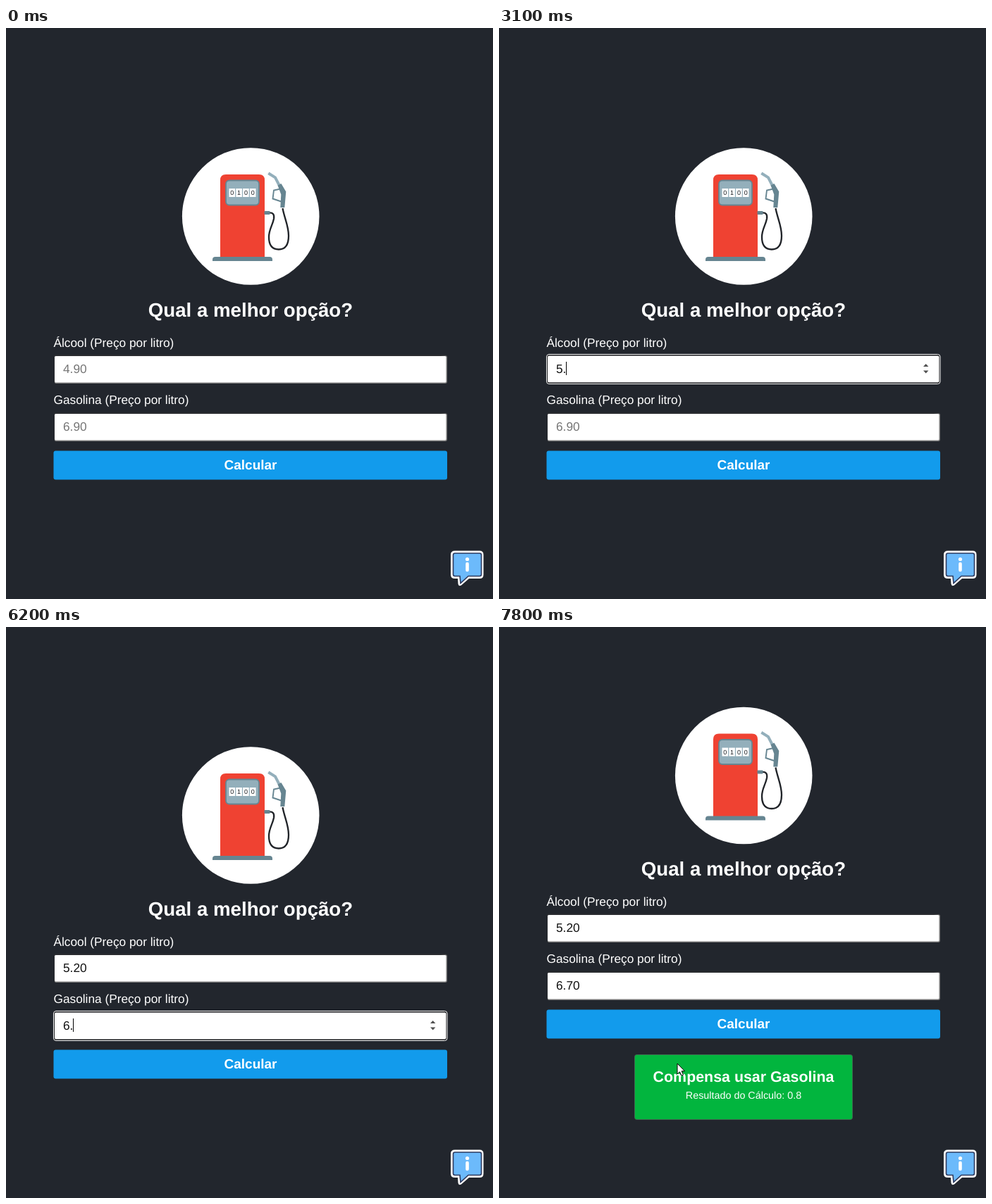
Animation of 691x811 px, one loop 8000 ms. Source, as an HTML page:

```html
<!DOCTYPE html>
<html lang="pt">
<head>
<meta charset="utf-8">
<title>Qual a melhor opção?</title>
<style>
  html, body { margin: 0; width: 100%; height: 100%; overflow: hidden; background: #22262d; }
  svg { display: block; }
  text { font: 17.28px "Liberation Sans", Arial, sans-serif; fill: #fff; text-rendering: geometricPrecision; white-space: pre; }
  .mid { text-anchor: middle; }
  .bold { font-weight: bold; }
  #title { font-size: 27.65px; }
  #button { font-size: 19px; }
  #verdict { font-size: 21.4px; }
  #ratio { font-size: 14.35px; }
  .digits text { font-size: 9px; fill: #16191d; }
  .value { fill: #111; }
  .value.hint { fill: #757575; }
</style>
</head>
<body>
<svg width="691" height="811" viewBox="0 0 691 811">
  <defs>
    <g id="box">
      <rect x="68" y="464" width="558" height="41" rx="3" fill="#2a2c30"/>
      <path d="M624 465.5q2 0 2 2V502q0 3-3 3H71q-2 0-2-2z" fill="#7b7b7b"/>
      <rect x="69" y="466" width="555.5" height="37.5" rx="1.5" fill="#fff"/>
    </g>
    <g id="ring">
      <rect x="67.5" y="463.5" width="558.5" height="42" rx="3.5" fill="#101114" stroke="#fff"/>
      <rect x="69" y="465.5" width="555.5" height="38" rx="2" fill="#fff"/>
    </g>
    <path id="spin" d="M602 481l3.7-4 3.7 4zM602 486.5l3.7 4 3.7-4z" fill="#505050"/>
  </defs>

  <g id="pump">
    <circle cx="347.2" cy="267.5" r="97.3" fill="#fff"/>
    <path d="M304 326V216q0-8 8-8h47q8 0 8 8v110z" fill="#ef4232"/>
    <path d="M293 331v-2q0-4 4-4h77q4 0 4 4v2z" fill="#668591"/>
    <rect x="312" y="216.5" width="47" height="35" rx="5" fill="#93afbb" stroke="#668591" stroke-width="1.8"/>
    <path d="M316.5 228h8.6v12h-8.6zM326.3 228h8.6v12h-8.6zM336.1 228h8.6v12h-8.6zM345.9 228h8.6v12h-8.6z" fill="#fff"/>
    <g class="digits mid bold">
      <text x="320.8" y="237.2">0</text><text x="330.6" y="237.2">1</text>
      <text x="340.4" y="237.2">0</text><text x="350.2" y="237.2">0</text>
    </g>
    <path d="M373 262.5C379 262 381 265 380 271C378 281 373 286 373 297C373 309 378 314.5 387 314.5C397 314.5 401 307 401 295C401 281 395 270 392.5 256" fill="none" stroke="#202328" stroke-width="2.3"/>
    <rect x="366.5" y="260" width="8" height="5" rx="1" fill="#668591"/>
    <path d="M372.3 206.3L382 212.3L387.5 223" fill="none" stroke="#93afbb" stroke-width="4"/>
    <path d="M389.5 228.5L380 230.5L378.5 242.5L390.5 246.5" fill="none" stroke="#668591" stroke-width="1.9"/>
    <path d="M385.5 223.5l5-2.5 6.8 11.5-2 22.5h-6l1-18.500z" fill="#668591"/>
  </g>

  <g id="form">
    <text id="title" class="mid bold" x="347" y="410">Qual a melhor opção?</text>
    <text x="67.5" y="453">Álcool (Preço por litro)</text>
    <text x="67.5" y="534.3">Gasolina (Preço por litro)</text>
    <g class="field">
      <use href="#box"/><use class="ring" href="#ring"/><use class="spin" href="#spin"/>
      <text class="value" x="81" y="490"></text>
    </g>
    <g class="field" transform="translate(0 82)">
      <use href="#box"/><use class="ring" href="#ring"/><use class="spin" href="#spin"/>
      <text class="value" x="81" y="489.500"></text>
    </g>
    <rect id="caret" width="1" height="19" fill="#000"/>
    <rect x="67.500" y="600.500" width="558.500" height="41" rx="3" fill="#129bec"/>
    <text id="button" class="mid bold" x="347" y="627">Calcular</text>
  </g>

  <g id="card">
    <rect x="192.500" y="607.500" width="309" height="92" rx="3" fill="#02b53e" stroke="#3f6a50"/>
    <text id="verdict" class="mid bold" x="347" y="645.500">Compensa usar Gasolina</text>
    <text id="ratio" class="mid" x="347" y="670.300">Resultado do Cálculo: 0.8</text>
  </g>

  <g id="info">
    <path d="M637 742.500h35q5.500 0 5.500 5.500v28.500q0 5.500-5.500 5.500H657l-11 9.500q-4 2-4.500-2l-.5-7.500h-4q-6 0-6-5.500V748q0-5.500 6-5.500z" fill="#fff"/>
    <path d="M637 746h35q2.500 0 2.500 2.500V776q0 2.500-2.500 2.500H656L645 788.500L644 778.500H637q-2.500 0-2.500-2.500V748.500q0-2.500 2.500-2.500z" fill="#6cbafb" stroke="#2d3a5e" stroke-width="1.600"/>
    <circle cx="654.500" cy="754.500" r="2.600" fill="#fff"/>
    <path d="M654.500 761v9" stroke="#fff" stroke-width="4.600" stroke-linecap="round"/>
  </g>

  <path id="arrow" d="M.5.5V15.500L4 12.300L6.500 17.700L9 16.600L6.600 11.300H11z" fill="#fff" stroke="#000" stroke-width="1"/>
  <path id="beam" d="M-4-8.500h3.500M1-8.500h3.500M0-8V8M-4 8.500h3.500M1 8.500h3.500" fill="none" stroke="#fff"/>
</svg>
<script>
  const LOOP = 8000, STEP = 100;
  const $ = id => document.getElementById(id);
  const show = (el, on) => el.style.display = on ? '' : 'none';
  const move = (el, x, y) => el.setAttribute('transform', `translate(${x} ${y})`);

  const fields = [...document.querySelectorAll('.field')].map((el, i) => ({
    ring: el.querySelector('.ring'),
    spin: el.querySelector('.spin'),
    value: el.querySelector('.value'),
    top: 464 + 82 * i,
    ...[
      { hint: '4.90', text: '5.20', keys: [1600, 3100, 3300, 3500], focus: [800, 4200] },
      { hint: '6.90', text: '6.70', keys: [5900, 6200, 6500, 6700], focus: [4200, 7600] }
    ][i]
  }));

  // The caret switches between shown and hidden at these times.
  const blinks = [800, 1300, 1600, 2100, 2700, 4000, 4200, 4700, 5200, 5700, 5900, 7200];
  const caretX = [81, 91, 95, 104, 114];

  // Pointer moves: [time, x, y]; the pointer is hidden while typing.
  const trips = [
    { end: 800, path: [[100, 15, 1], [300, 75, 215], [500, 155, 440], [600, 173, 485]] },
    { end: 4300, path: [[4000, 173, 490], [4100, 173, 555], [4200, 173, 566]] },
    { end: LOOP, path: [[7200, 173, 566], [7400, 225, 602], [7500, 248, 617], [7600, 252.5, 619.5]] }
  ];

  function pointer(t) {
    const trip = trips.find(p => t >= p.path[0][0] && t < p.end);
    if (!trip) return null;
    const { path } = trip;
    const n = path.findIndex(p => p[0] > t);
    if (n < 0) return path[path.length - 1].slice(1);
    const [a, b] = [path[n - 1], path[n]];
    const k = (t - a[0]) / (b[0] - a[0]);
    return [a[1] + (b[1] - a[1]) * k, a[2] + (b[2] - a[2]) * k];
  }

  function draw(t) {
    const pos = pointer(t);
    const done = t >= 7700;
    let overField = false;
    show($('caret'), blinks.filter(b => b <= t).length % 2);

    fields.forEach(f => {
      const typed = f.keys.filter(k => k <= t).length;
      const focused = t >= f.focus[0] && t < f.focus[1];
      const hover = pos && !done && pos[0] > 68 && pos[1] > f.top && pos[1] < f.top + 41;
      overField = overField || hover;
      show(f.ring, focused);
      show(f.spin, focused || hover);
      f.value.textContent = typed ? f.text.slice(0, typed) : f.hint;
      f.value.classList.toggle('hint', !typed);
      if (focused) move($('caret'), caretX[typed], f.top + (typed ? 10 : 11));
    });

    move($('pump'), 0, done ? -56.5 : 0);
    move($('form'), 0, done ? -57 : 0);
    show($('card'), done);
    const size = t < 7800 ? 0.968 : 1;
    $('card').setAttribute('transform', `translate(347 653.5) scale(${size}) translate(-347 -653.5)`);

    show($('arrow'), pos && !overField);
    show($('beam'), pos && overField);
    if (pos) move(overField ? $('beam') : $('arrow'), ...pos);
  }

  const start = performance.now();
  function tick() {
    const t = (performance.now() - start) % LOOP;
    draw(Math.floor(t / STEP) * STEP);
    requestAnimationFrame(tick);
  }
  tick();
</script>
</body>
</html>
```
